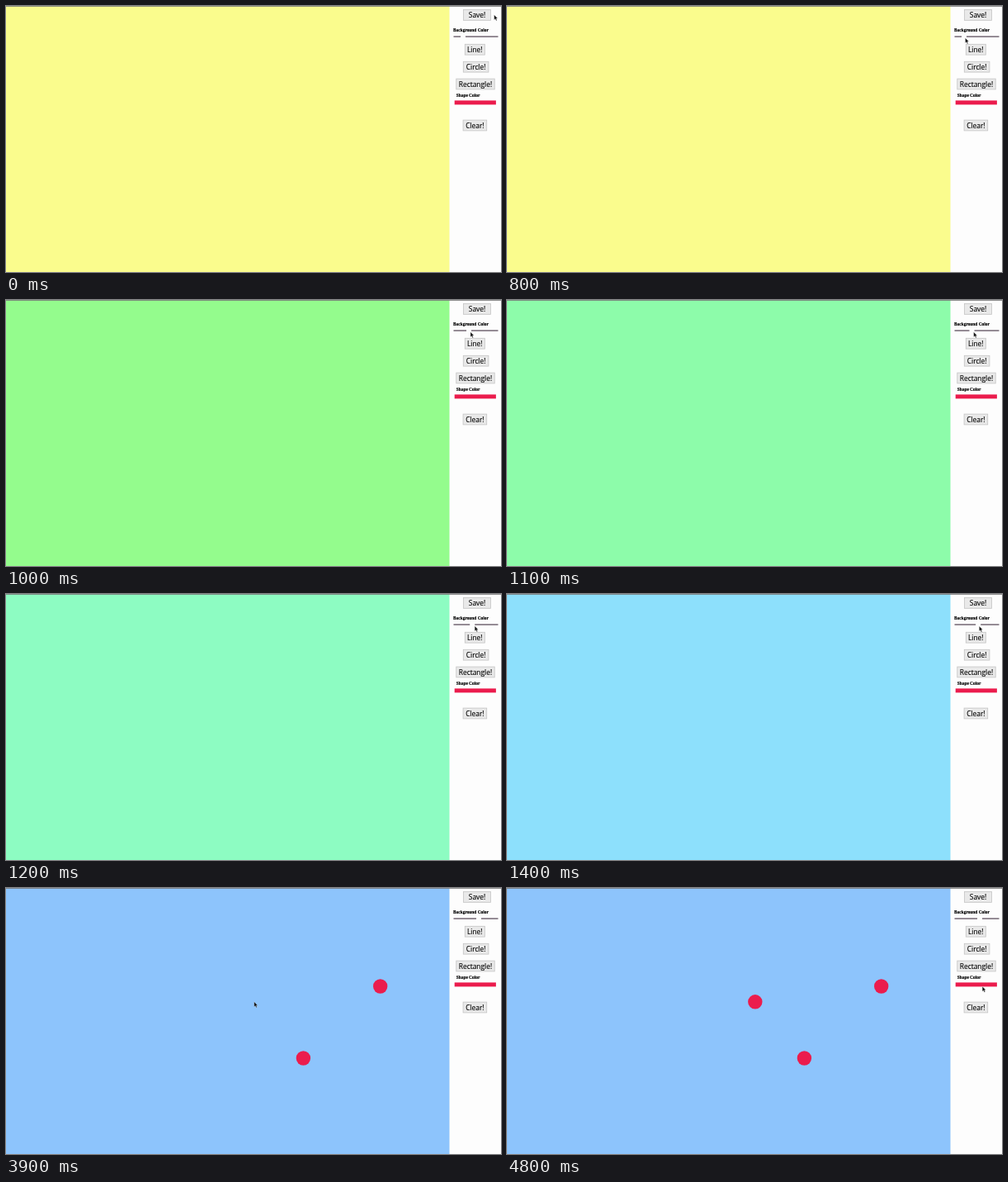
Write an HTML page that moves like this. It is 600 by 322 pixels and loops after 5000 ms.

```html
<!DOCTYPE html>
<html lang="en">
<head>
<meta charset="utf-8">
<title>Shape drawing board</title>
<style>
  html, body { margin: 0; width: 100%; height: 100%; overflow: hidden; background: #fdfdfd; }
  svg { display: block; width: 100%; height: 100%; }
  .button rect { fill: #e9e9e9; stroke: #c4c4c4; stroke-width: .8; }
  .button.down rect { fill: #d6d6d6; }
  .button text { font: 8.4px "Open Sans", sans-serif; text-anchor: middle; fill: #000; stroke: #000; stroke-width: .12; }
  .label { font: bold 5.4px "Liberation Serif", serif; fill: #000; stroke: #000; stroke-width: .15; }
  .dot { fill: #eb1c4d; }
</style>
</head>
<body>
<svg viewBox="0 0 600 322">
  <rect width="600" height="322" fill="#fdfdfd"/>
  <rect id="board" width="537.5" height="322"/>
  <rect width="600" height=".8" fill="#777"/>
  <g id="dots"></g>
  <g id="buttons"></g>
  <text class="label" x="542" y="31">Background Color</text>
  <text class="label" x="545.7" y="109.8">Shape Color</text>
  <rect x="542.5" y="36.4" width="54" height="1.3" fill="#5e505e"/>
  <rect id="thumb" y="34" width="6" height="6" rx="2.4" fill="#fdfdfd"/>
  <rect class="dot" x="543.7" y="114.4" width="50.2" height="5"/>
  <path id="cursor" d="M0 0V6L1.4 4.8L2.4 7L3.4 6.5L2.4 4.4H4.2Z"
        fill="#111" stroke="#fff" stroke-opacity=".6" stroke-width=".4"/>
</svg>
<script>
const LOOP = 5000, STEP = 100;
const $ = id => document.getElementById(id);

function add(parent, tag, attrs, text) {
  const el = document.createElementNS('http://www.w3.org/2000/svg', tag);
  for (const key in attrs) el.setAttribute(key, attrs[key]);
  if (text) el.textContent = text;
  return parent.appendChild(el);
}

function addButton(name, cx, cy, width) {
  const g = add($('buttons'), 'g', { class: 'button' });
  add(g, 'rect', { x: cx - width / 2, y: cy - 6.4, width, height: 12.8 });
  add(g, 'text', { x: cx, y: cy + 3.2 }, name);
  return g;
}

addButton('Save!', 571, 10.9, 33);
addButton('Line!', 568.3, 52.7, 24);
const circleButton = addButton('Circle!', 569.6, 73.7, 30.6);
addButton('Rectangle!', 569, 94.5, 46.4);
addButton('Clear!', 568.4, 144.5, 28.6);

// Each move eases to a point and rests there: [start, end, ...point]
const cursorMoves = [
  [0, 100, 564, 28.5],
  [200, 600, 552, 38.5],
  [700, 800, 555.5, 38.7],
  [800, 1000, 563, 38.7],      // drag the slider
  [1000, 1500, 573.7, 39],
  [1600, 2000, 571.5, 102],
  [2000, 2200, 570.5, 75],     // press Circle!
  [2400, 2500, 545, 88.5],
  [2500, 2900, 453.7, 119],    // place the dots
  [3000, 3300, 360.4, 206],
  [3500, 3900, 300.8, 137.8],
  [4100, 4500, 581, 119],
  [4500, 4800, 576.2, 119.2]
];
const hueMoves = [[800, 1000, 116], [1000, 1200, 149], [1200, 1500, 210]];

const ease = p => 1 - (1 - p) ** 1.3;

function follow(moves, from, t) {
  let pos = from;
  for (const [start, end, ...to] of moves) {
    if (t <= start) break;
    const k = ease(Math.min(1, (t - start) / (end - start)));
    pos = pos.map((v, i) => v + (to[i] - v) * k);
  }
  return pos;
}

const cursorAt = t => follow(cursorMoves, [591.7, 10.7], t);

const dots = [3000, 3500, 4100].map(time => {
  const [cx, cy] = cursorAt(time);
  return { time, el: add($('dots'), 'circle', { class: 'dot', cx, cy, r: 8.7 }) };
});

function draw(ms) {
  const t = Math.floor(ms % LOOP / STEP) * STEP;
  const [x, y] = cursorAt(t);
  const [hue] = follow(hueMoves, [61], t);
  $('cursor').setAttribute('transform', `translate(${x} ${y})`);
  $('thumb').setAttribute('x', 551 + (hue - 61) / 7.84);
  $('board').setAttribute('fill', `hsl(${hue}, 95%, 77%)`);
  circleButton.classList.toggle('down', t === 2200);
  for (const dot of dots) dot.el.style.display = t >= dot.time ? '' : 'none';
}

const start = performance.now();
function tick() {
  draw(performance.now() - start);
  requestAnimationFrame(tick);
}
tick();
</script>
</body>
</html>
```
